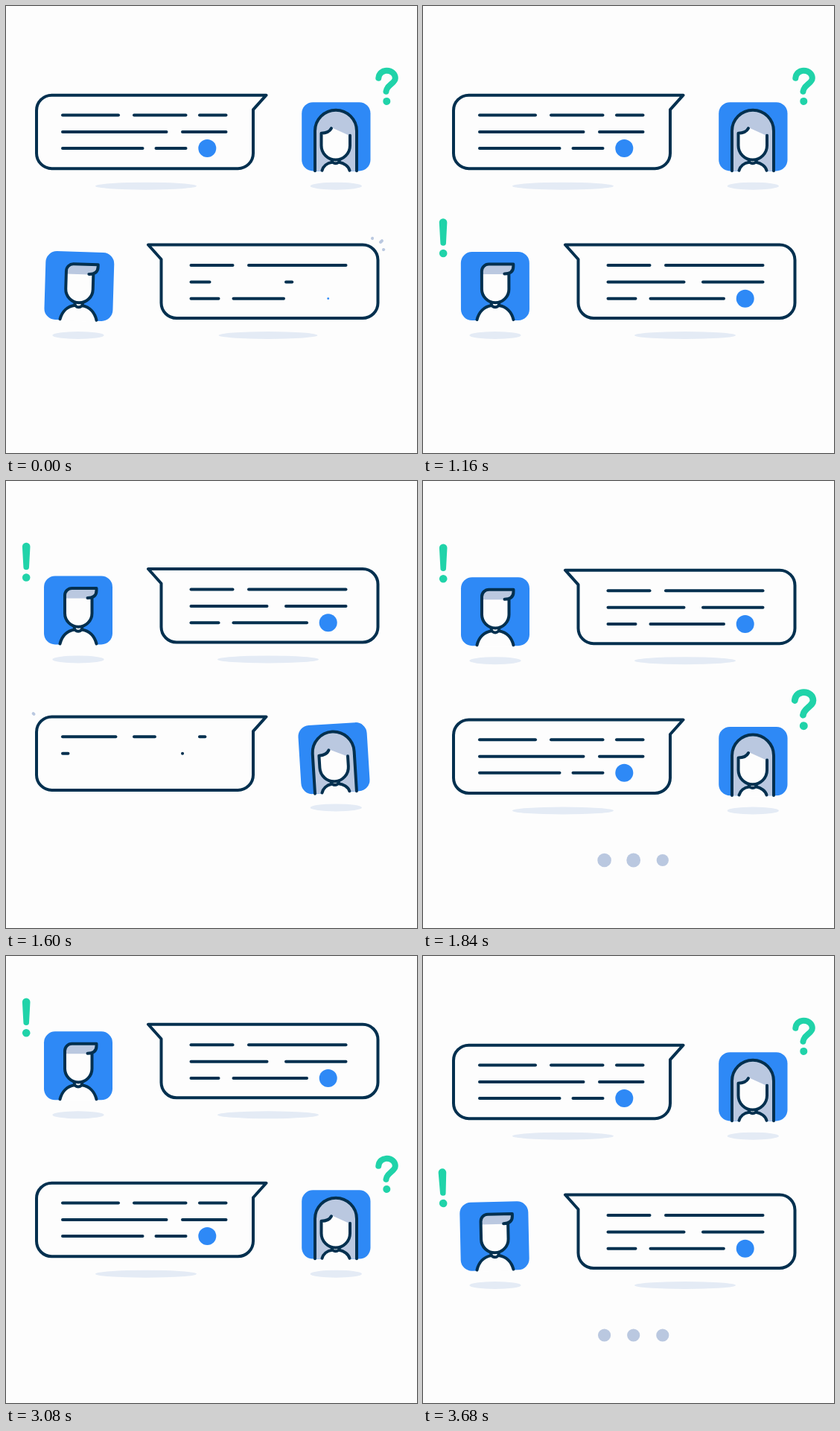
Animation of 552x600 px, one loop 3720 ms. Source, as an HTML page:

```html
<!DOCTYPE html>
<html lang="en">
<head>
<meta charset="utf-8">
<title>Conversation</title>
<style>
  html, body { margin: 0; width: 100%; height: 100%; overflow: hidden; background: #fdfdfd; }
  svg { display: block; width: 552px; height: 600px; }
  .ink { fill: none; stroke: #03304f; stroke-width: 4; stroke-linecap: round; stroke-linejoin: round; }
  .paper { fill: #fdfdfd; }
  .blue { fill: #2e89f6; }
  .hair { fill: #bac8e0; }
  .shade { fill: #e4ebf5; }
  .mint { fill: #20d3a9; }
  .hook { fill: none; stroke: #20d3a9; stroke-width: 8; stroke-linecap: round; }
  .spark { stroke: #bac8e0; stroke-width: 4; stroke-linecap: round; }
</style>
</head>
<body>
<svg id="stage" viewBox="0 0 552 600"></svg>
<script>
const LOOP = 3720, TURN = 1780, RISE = 200.8;
const NS = 'http://www.w3.org/2000/svg';
const stage = document.getElementById('stage');

const clamp = u => Math.max(0, Math.min(1, u));
const span = (t, start, dur) => clamp((t - start) / dur);
const sine = u => (1 - Math.cos(Math.PI * u)) / 2;
const quad = u => u < .5 ? 2 * u * u : 1 - 2 * (1 - u) ** 2;
const cubic = u => u < .5 ? 4 * u ** 3 : 1 - 4 * (1 - u) ** 3;
const back = u => 1 + 2.7 * (u - 1) ** 3 + 1.7 * (u - 1) ** 2;

function add(parent, tag, attrs = {}) {
  const el = document.createElementNS(NS, tag);
  set(el, attrs);
  return parent.appendChild(el);
}
function set(el, attrs) {
  for (const k in attrs) el.setAttribute(k, attrs[k]);
}
function show(el, on) {
  el.style.display = on ? '' : 'none';
}
function scaleAt(el, x, y, s, turn = 0) {
  show(el, s > 0);
  set(el, { transform: `translate(${x} ${y}) rotate(${turn}) scale(${s}) translate(${-x} ${-y})` });
}

const BUBBLE = 'M191 320.5H479A20.5 20.5 0 0 1 499.5 341V398.5A20.5 20.5 0 0 1 479 419H229A20.5 20.5 0 0 1 208.5 398.5V340Z';

// Lines: x, y, end x, start time, duration
const MAN = {
  pivot: [97, 422], sign: [27.2, 332], disc: [432.7, 392.7, 198], shadow: [352, 442], sparkAt: 184, flip: '',
  lines: [
    [248.5, 348, 304.5, -73, 170], [326, 348, 456.5, -50, 200],
    [248.5, 370.5, 350.5, 145, 170], [376, 370.5, 456.5, 170, 150],
    [248.5, 392.7, 285.5, -5, 180], [305.5, 392.7, 404, -10, 340]
  ],
  avatar: `
    <rect class="blue" x="51" y="330" width="92" height="92" rx="15"/>
    <path class="paper" d="M72.5 423C75 411 82 403.5 92 402L97 398L102 402C112 403.5 119 411 121.500 423Z"/>
    <path class="ink" d="M72.5 421C75 411 82 403.5 92 402M102 402C112 403.5 119 411 121.5 421"/>
    <path class="ink paper" style="fill:#fdfdfd" d="M91.700 399A5.3 5.3 0 0 0 102.300 399"/>
    <path class="paper" d="M79 355H115.5V380A18.2 18.2 0 0 1 79 380Z"/>
    <path class="hair" d="M79 360V356A9.5 9.5 0 0 1 88.5 346.5H121.5V350C121.5 356 117.5 360 109.5 360Z"/>
    <path class="ink" d="M115.5 360V380A18.2 18.2 0 0 1 79 380V356A9.5 9.5 0 0 1 88.5 346.5H121.5V349.5C121.5 356 117.5 359.5 109.5 359.5"/>`,
  mark: `
    <path class="mint" d="M21.9 290.5A5.3 5.3 0 0 1 32.5 290.5L31 318A3.8 3.8 0 0 1 23.4 318Z"/>
    <circle class="mint" cx="27.2" cy="332" r="5.3"/>`
};

const WOMAN = {
  pivot: [443.3, 422.5], sign: [511.3, 328.7], disc: [270.3, 391.8, 150], shadow: [188, 442.5], sparkAt: 10,
  flip: 'translate(540.5 0) scale(-1 1)',
  lines: [
    [76, 347.3, 151, -125, 170], [172, 347.3, 241.5, -62, 190], [260, 347.3, 295.5, -30, 170],
    [76, 369.8, 215.5, -5, 175], [237, 369.8, 295.5, 18, 170],
    [76, 391.8, 183.5, 50, 170], [201.5, 391.8, 241.5, 90, 150]
  ],
  avatar: `
    <rect class="blue" x="397.2" y="330" width="92.3" height="92.3" rx="15"/>
    <path class="hair" d="M415 422V368.5A28 28 0 0 1 471 368.5V422Z"/>
    <path class="paper" d="M424.5 423.3C426 416 431 411.5 438 410.5L442.700 407L447.500 410.5C454 411.5 460 416 461.5 423.3Z"/>
    <path class="ink" d="M424.5 421.5C426 416 431 411.5 438 410.5M447.5 410.5C454 411.5 460 416 461.5 421.5"/>
    <path class="ink" style="fill:#fdfdfd" d="M437.5 407.5A5.300 5.3 0 0 0 448 407.5"/>
    <path class="paper" d="M423.5 371.5C431 371.5 435 369 437.5 364L462 375V388A19.2 19.2 0 0 1 423.5 388Z"/>
    <path class="ink" d="M415 422V368.5A28 28 0 0 1 471 368.5V422
      M462 374.5V388A19.2 19.2 0 0 1 423.5 388V371.5C431 371.5 435 369 437 365"/>`,
  mark: `
    <path class="hook" d="M500.3 297.6C501 291 505.5 287.6 511.5 287.6C518 287.6 522.8 292 522.8 297.5C522.8 305 511.3 306.5 510.5 315.5"/>
    <circle class="mint" cx="511.3" cy="328.7" r="5"/>`
};

const RAYS = [[4, -19, 12], [15, -14, 0], [19, -4, 12]];

function buildGroup(kind, at) {
  const g = add(stage, 'g');
  add(g, 'ellipse', { class: 'shade', cx: kind.pivot[0], cy: kind.shadow[1], rx: 34.7, ry: 5 });
  const shadow = add(g, 'ellipse', { class: 'shade', cx: kind.shadow[0], cy: kind.shadow[1], rx: 68, ry: 5 });
  const frame = add(g, 'g', { transform: kind.flip });
  add(frame, 'path', { class: 'ink', d: BUBBLE, style: 'fill:#fdfdfd' });
  const rays = RAYS.map(() => add(frame, 'line', { class: 'spark' }));
  const lines = kind.lines.map(([x, y]) => add(g, 'line', { class: 'ink', x1: x, y1: y, y2: y }));
  const disc = add(g, 'circle', { class: 'blue', cx: kind.disc[0], cy: kind.disc[1], r: 12 });
  const avatar = add(g, 'g');
  avatar.innerHTML = kind.avatar;
  const mark = add(g, 'g');
  mark.innerHTML = kind.mark;
  return { kind, at, g, shadow, rays, lines, disc, avatar, mark };
}

// Vertical offset: rise from below, move up one row, then leave
function offset(t) {
  const enter = t < 50 ? 330 - 335.2 * cubic(span(t, -260, 310)) : -5.2 * (1 - sine(span(t, 50, 110)));
  const u = t - TURN;
  const up = u < 10 ? -(RISE + 1.8) * quad(span(u, -350, 360)) : -RISE - 1.8 * (1 - sine(span(u, 10, 90)));
  return enter + up - 290 * quad(span(u - TURN, -358, 360));
}

function wobble(t) {
  const s = Math.max(0, t);
  return -4.3 * Math.cos(2 * Math.PI * s / 350) / (1 + s / 160) * (1 - span(s, 1200, 250));
}

function drawGroup(o, time) {
  const t = time - o.at, k = o.kind;
  const on = t > -260 && t < 2 * TURN + 2;
  show(o.g, on);
  if (!on) return;
  set(o.g, { transform: `translate(0 ${offset(t)})` });

  const turn = wobble(t);
  set(o.avatar, { transform: `rotate(${turn} ${k.pivot})` });
  scaleAt(o.mark, ...k.sign, back(span(t, 205, 105)), turn * 1.4);
  scaleAt(o.disc, k.disc[0], k.disc[1], back(span(t, k.disc[2], 115)));
  scaleAt(o.shadow, ...k.shadow, sine(span(t, 20, 200)));

  k.lines.forEach(([x, , end, start, dur], i) => {
    const u = span(t, start, dur);
    show(o.lines[i], u > 0);
    set(o.lines[i], { x2: x + (end - x) * sine(u) + .01 });
  });

  RAYS.forEach(([x, y, lag], i) => {
    const u = span(t, k.sparkAt + lag, 120);
    const from = 1 + .7 * sine(clamp(2 * u - 1)), to = 1 + .7 * sine(clamp(2 * u));
    show(o.rays[i], u > 0 && u < 1);
    set(o.rays[i], { x1: 488 + x * from, y1: 331 + y * from, x2: 488.01 + x * to, y2: 331 + y * to });
  });
}

const groups = [WOMAN, MAN, WOMAN, MAN].map((kind, i) => buildGroup(kind, -200 + (i - 1) * TURN));
const dots = [243.6, 282.7, 321.8].map(x => add(stage, 'circle', { class: 'hair', cx: x, cy: 509 }));

function draw(now) {
  const time = now % LOOP;
  groups.forEach(o => drawGroup(o, time));
  const t = (time + 200) % TURN;
  dots.forEach((dot, i) => {
    const size = back(span(t, 205 + 15 * i, 80)) * (1 - sine(span(t, 1020 + 40 * i, 120)));
    set(dot, { r: Math.max(0, 8.6 * size) });
  });
}

const began = performance.now();
function tick() {
  draw(performance.now() - began);
  requestAnimationFrame(tick);
}
tick();
</script>
</body>
</html>
```
